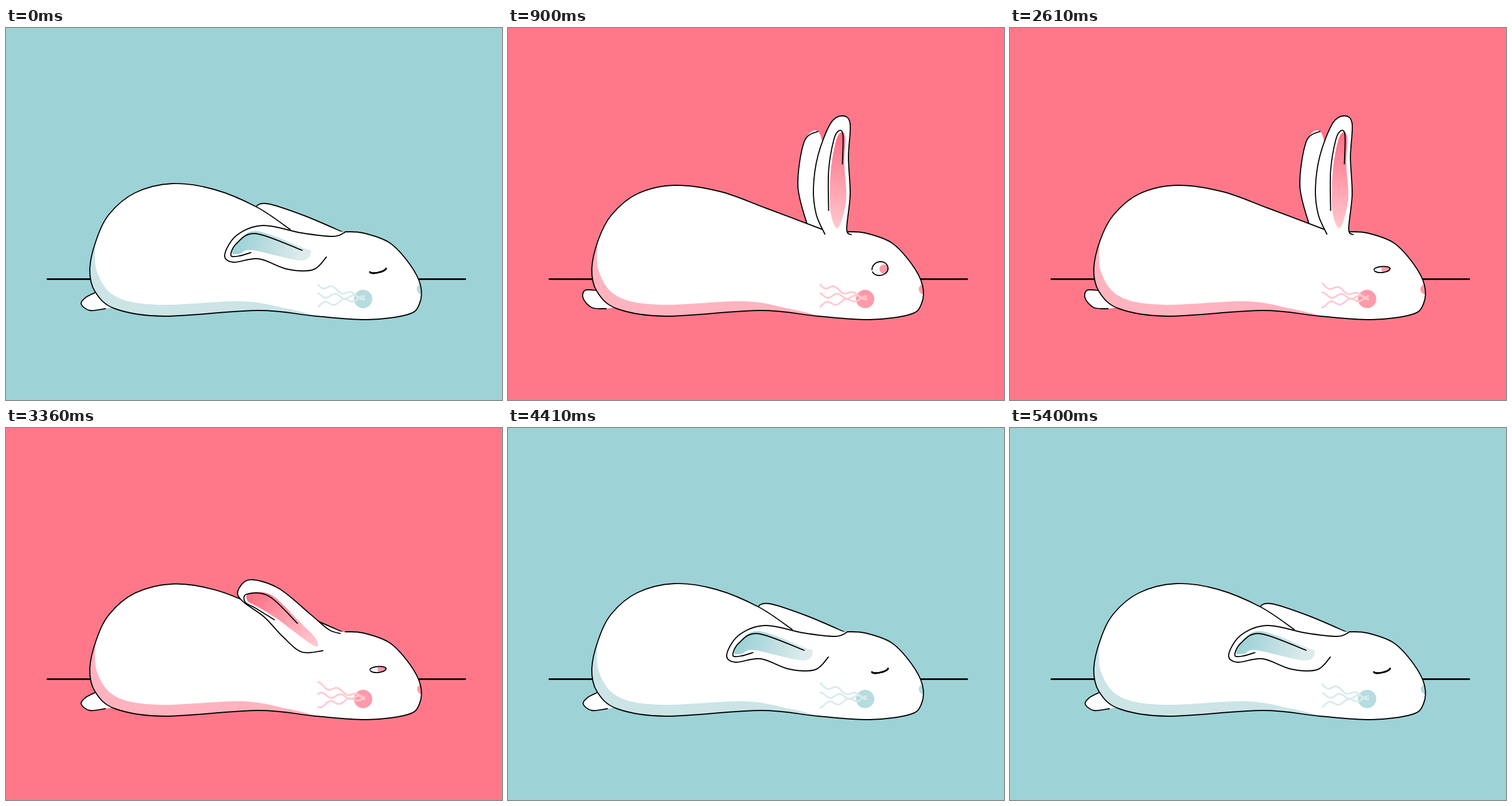
Animation, 864 px wide and 648 px high, one loop 5430 ms. Source, as an HTML page with a canvas:

```html
<!DOCTYPE html>
<html lang="en">
<head>
<meta charset="utf-8">
<title>Sleepy rabbit</title>
<style>
  html, body { margin: 0; width: 100%; height: 100%; overflow: hidden; background: #9dd2d6; }
  canvas { display: block; width: 864px; height: 648px; }
</style>
</head>
<body>
<canvas id="stage" width="864" height="648"></canvas>
<script>
const LOOP = 5430;
const ctx = document.getElementById('stage').getContext('2d');
const pts = s => s.split(' ').map(p => p.split(',').map(Number));

// Key points of the ear, base to tip to base: up, leaning, lying.
const EAR = [
  pts('552,359 537,325 532,280 540,222 562,166 583,153 596,167 593,225 596,290 590,350 598,360'),
  pts('552,388 515,390 482,363 450,329 413,302 404,284 425,264 475,279 530,324 562,351 582,358'),
  pts('558,399 535,421 490,420 440,402 396,408 381,395 402,361 448,344 515,357 570,363 590,356')
];
const INNER = [
  pts('575,348 562,321 562,252 571,198 580,182 587,190 586,240 589,300'),
  pts('536,379 472,332 440,312 421,301 424,287 463,291 512,338 540,367'),
  pts('513,405 429,387 408,393 394,392 404,371 438,354 518,383 531,390')
];
const EAR_TURN = [-1.17, -0.65];
const EAR_PIVOT = [572, 358];

// Remaining parts: awake, asleep.
const BACK_EAR = [
  pts('521,342 505,275 516,198 540,180 552,230 560,340'),
  pts('495,351 460,333 436,314 455,306 520,327 590,357')
];
const BACK_TURN = -1.05;
const BACK_PIVOT = [570, 355];
const SPINE = [
  pts('180,326 225,289 290,274 370,285 450,314 548,351'),
  pts('180,324 225,287 290,271 362,281 437,312 495,351')
];
const TAIL = [
  pts('154,457 134,457 131,471 146,487 171,489'),
  pts('155,461 138,470 131,481 146,492 173,489')
];
const BELLY = pts('591,355 622,357 668,374 703,411 722,448 720,481 700,499 630,508 540,502 440,492 275,502 190,489 155,459 146,420 157,370');
const SHADE = pts('156,369 158,423 190,467 265,482 410,476 490,489 548,503');

// Each colour is [awake, asleep].
const COLORS = {
  back: [[255, 120, 138], [157, 210, 214]],
  shade: [[255, 179, 190], [203, 228, 230]],
  cheek: [[255, 154, 170], [181, 220, 223]],
  whisker: [[255, 201, 208], [216, 235, 237]],
  earTip: [[255, 110, 132], [157, 210, 214]],
  earBase: [[255, 200, 207], [222, 235, 236]]
};

const mix = (a, b, k) => a + (b - a) * k;
const mixPts = ([a, b], k) => a.map((p, i) => [mix(p[0], b[i][0], k), mix(p[1], b[i][1], k)]);
const easeIn = k => k ** 1.6;
const easeOut = k => 1 - (1 - k) ** 2;
const easeInOut = k => k < 0.5 ? 2 * k * k : 1 - 2 * (1 - k) ** 2;

// Segments are [start, end, target value, easing].
function track(t, value, segments) {
  for (const [start, end, to, ease = easeInOut] of segments) {
    if (t <= start) break;
    value = mix(value, to, ease(Math.min(1, (t - start) / (end - start))));
  }
  return value;
}

function turn([x, y], a) {
  const c = Math.cos(a), s = Math.sin(a);
  return [x * c - y * s, x * s + y * c];
}

// Blend two poses along an arc around the pivot.
function swing(a, b, k, angle, [px, py]) {
  return a.map(([x, y], i) => {
    const [bx, by] = turn([b[i][0] - px, b[i][1] - py], -angle);
    const [rx, ry] = turn([mix(x - px, bx, k), mix(y - py, by, k)], angle * k);
    return [rx + px, ry + py];
  });
}

function earPose(poses, value) {
  const i = Math.min(1, Math.floor(value));
  return swing(poses[i], poses[i + 1], value - i, EAR_TURN[i], EAR_PIVOT);
}

// Smooth curve through points.
function curve(p, closed = false) {
  const path = new Path2D();
  const n = p.length;
  const at = i => closed ? p[(i + n) % n] : p[Math.max(0, Math.min(n - 1, i))];
  path.moveTo(...p[0]);
  for (let i = 0; i < (closed ? n : n - 1); i++) {
    const [a, b, c, d] = [at(i - 1), at(i), at(i + 1), at(i + 2)];
    path.bezierCurveTo(
      b[0] + (c[0] - a[0]) / 6, b[1] + (c[1] - a[1]) / 6,
      c[0] - (d[0] - b[0]) / 6, c[1] - (d[1] - b[1]) / 6, c[0], c[1]);
  }
  return path;
}

function fill(path, color) {
  ctx.fillStyle = color;
  ctx.fill(path);
}

function stroke(path, color = '#000', width = 1.9) {
  ctx.strokeStyle = color;
  ctx.lineWidth = width;
  ctx.stroke(path);
}

function disc(x, y, r, color) {
  const path = new Path2D();
  path.arc(x, y, r, 0, Math.PI * 2);
  fill(path, color);
}

function clipped(path, paint) {
  ctx.save();
  ctx.clip(path);
  paint();
  ctx.restore();
}

function drawTail(value) {
  const line = curve(mixPts(TAIL, value));
  const shape = new Path2D(line);
  shape.lineTo(184, 487);
  shape.lineTo(170, 465);
  fill(shape, '#fff');
  stroke(line);
}

function drawBackEar(value) {
  const p = swing(...BACK_EAR, value, BACK_TURN, BACK_PIVOT);
  const shape = curve(p);
  shape.lineTo(540, 368);
  fill(shape, '#fff');
  stroke(curve(value < 0.02 ? p.slice(0, 4) : p));
}

function drawBody(value, sniff, color) {
  const outline = curve([...BELLY, ...mixPts(SPINE, value)]);
  fill(outline, '#fff');
  clipped(outline, () => {
    const shade = curve(SHADE);
    shade.lineTo(548, 530);
    shade.lineTo(130, 530);
    shade.lineTo(130, 369);
    fill(shade, color.shade);
    disc(724.5 + sniff, 455, 9, color.cheek);
  });
  stroke(outline);
}

function drawEar(value, color) {
  const outline = curve(earPose(EAR, value));
  const inner = earPose(INNER, value);
  const glow = ctx.createLinearGradient(...inner[4], ...inner[0]);
  glow.addColorStop(0, color.earTip);
  glow.addColorStop(1, color.earBase);
  fill(outline, '#fff');
  fill(curve(inner, true), glow);
  stroke(outline);

  // The fold follows the inner edge, nudged sideways as the ear turns.
  const angle = track(value, 0, [[0, 1, EAR_TURN[0], k => k], [1, 2, EAR_TURN[0] + EAR_TURN[1], k => k]]);
  const [dx, dy] = turn([-3.5, -3.2], angle);
  stroke(curve(inner.slice(1, 7).map(([x, y]) => [x + dx, y + dy])));
}

function lid(height, tilt, from) {
  const p = [];
  for (let i = 0; i <= 8; i++) {
    const a = mix(from, Math.PI, i / 8);
    p.push([648 - 14 * Math.cos(a), 419 + tilt + tilt * Math.cos(a) + height * Math.sin(a)]);
  }
  return p;
}

// Squint narrows the eye, shut brings both lids together.
function drawEye(squint, shut, color) {
  const tilt = mix(1, 3, shut);
  const upper = lid(mix(mix(-13, -4.5, squint), 4, shut), tilt, 0);
  const lower = lid(mix(mix(11, 6, squint), 4, shut), tilt, mix(0.35, 0, shut));
  clipped(curve([...upper, ...lower.reverse()]), () => disc(655, 420, 8, color.cheek));
  const width = mix(1.9, 2.8, shut);
  stroke(curve(upper), '#000', width);
  stroke(curve(lower), '#000', width);
}

function drawWhiskers(t, color) {
  disc(622, 472, 16, color.cheek);
  for (let i = 0; i < 3; i++) {
    const path = new Path2D();
    for (let x = 544; x <= 624; x += 2) {
      const k = (x - 544) / 80;
      const crest = 552 + 5 * i * i;
      const wave = Math.cos(2 * Math.PI * ((x - crest) / 33 + t * 6 / LOOP));
      path.lineTo(x, mix(447 + 18 * i, 470, k) + mix(4.4, 3, k) * wave);
    }
    stroke(path, color.whisker, 3);
  }
}

function draw(t) {
  const sleep = track(t, 1, [[30, 300, 0], [4020, 4400, 1]]);
  const ear = track(t, 2, [[30, 500, 0, easeOut], [2860, 3360, 1, easeIn], [3360, 3840, 2, easeOut]]);
  const backEar = track(t, 1, [[30, 530, 0, easeOut], [2640, 3130, 1]]);
  const body = track(t, 1, [[30, 530, 0], [2850, 3620, 1]]);
  const tail = track(t, 1, [[30, 530, 0], [2880, 3340, 1]]);
  const squint = track(t, 0, [[1260, 1560, 1]]);
  const shut = track(t, 1, [[60, 420, 0, easeOut], [4050, 4410, 1]]);
  const sniff = t > 300 && t < 4020 ? 0.8 * Math.sin((t - 300) * Math.PI / 150) : 0;

  const color = {};
  for (const [name, [awake, asleep]] of Object.entries(COLORS)) {
    color[name] = `rgb(${awake.map((c, i) => Math.round(mix(c, asleep[i], sleep)))})`;
  }

  ctx.lineCap = ctx.lineJoin = 'round';
  ctx.fillStyle = color.back;
  ctx.fillRect(0, 0, 864, 648);
  stroke(new Path2D('M72 437.5H150M716 437.5H800'), '#000', 2.8);
  drawTail(tail);
  drawBackEar(backEar);
  drawBody(body, sniff, color);
  drawEar(ear, color);
  drawEye(squint, shut, color);
  drawWhiskers(t, color);
}

const start = performance.now();
function tick() {
  draw((performance.now() - start) % LOOP);
  requestAnimationFrame(tick);
}
tick();
</script>
</body>
</html>
```
